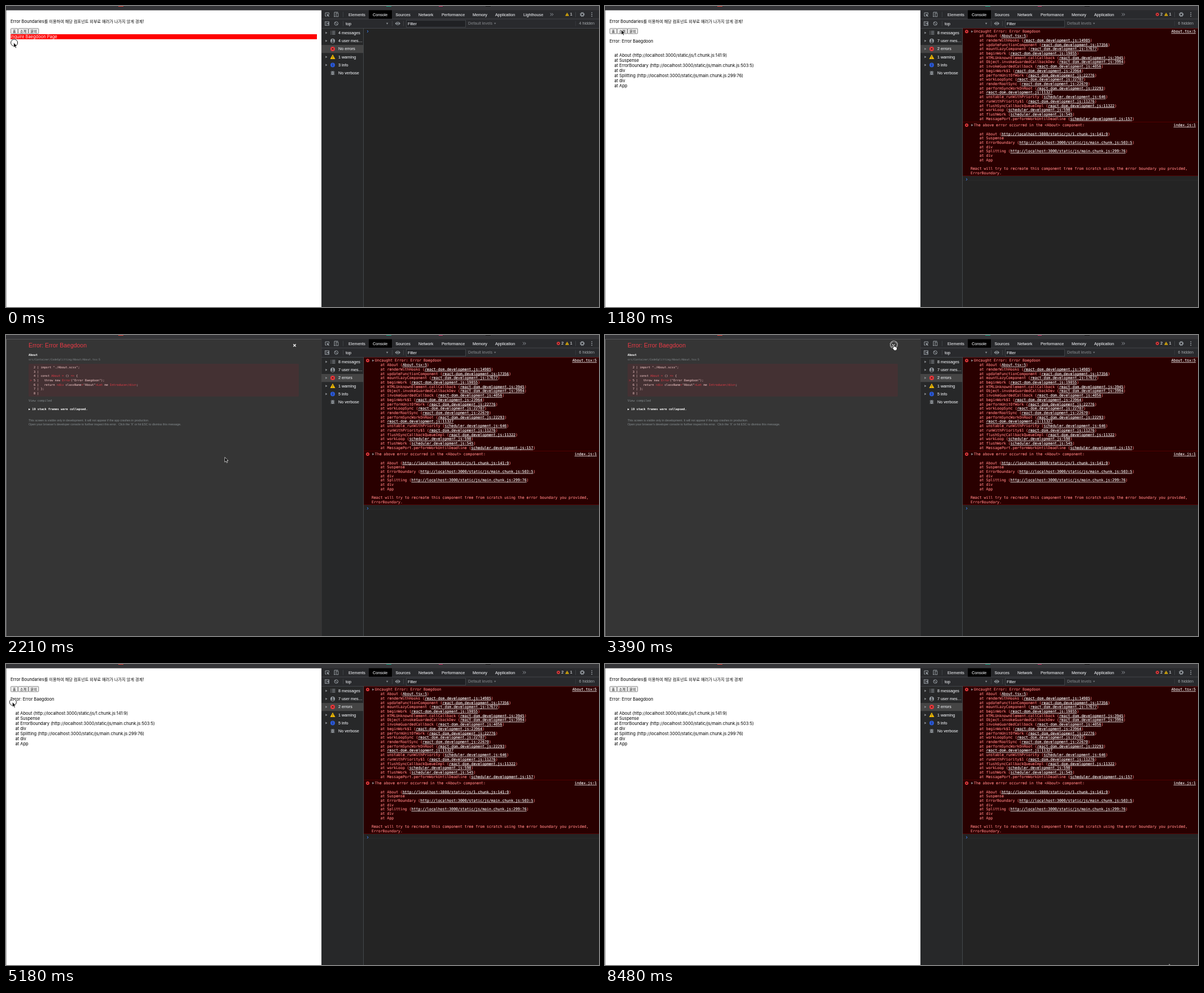
Recreate the animation shown at these times as an HTML page. Size 1051 by 533 pixels, loop 8.6 s.

```html
<!DOCTYPE html>
<html lang="ko">
<head>
<meta charset="utf-8">
<title>Error boundary demo</title>
<style>
html, body { margin: 0; width: 100%; height: 100%; overflow: hidden; background: #fff; }
svg { display: block; }
text { white-space: pre; }
.page { font: 7.5px Inter, "Noto Sans CJK KR", sans-serif; fill: #000; }
.ko { font-family: Inter, "Noto Sans CJK KR", "Noto Sans CJK", sans-serif; font-size: 7.18px; }
.btn { font: 6px "Noto Sans CJK KR", "Noto Sans CJK", sans-serif; text-anchor: middle; }
.ui { font: 7.2px "Liberation Sans", Arial, sans-serif; fill: #e8eaed; stroke: #e8eaed; stroke-width: .1; }
.dim { fill: #85888c; stroke: none; }
.soft { fill: #a4a8ac; stroke: none; }
.log { font: 6.52px "DejaVu Sans Mono", monospace; fill: #ff8080; stroke: #ff8080; stroke-width: .1; }
.log tspan { fill: #fff; stroke: #fff; text-decoration: underline; text-decoration-thickness: .6px; }
.end { text-anchor: end; }
.code { font: 5.22px "DejaVu Sans Mono", monospace; fill: #fccfcf; }
.code tspan { fill: #e83b46; }
.mono { font: 5.27px "DejaVu Sans Mono", monospace; fill: #fff; }
.bold { font-weight: bold; }
.path { font-size: 4.7px; }
.title { font: 10.47px "Liberation Sans", Arial, sans-serif; fill: #e83b46; }
.foot { font: 5.26px "Liberation Sans", Arial, sans-serif; }
.grey { fill: #878e91; }
.line { fill: none; stroke: #9aa0a6; }
</style>
</head>
<body>
<svg id="stage" width="1051" height="533" viewBox="0 0 1051 533"></svg>
<script>
const LOOP = 8600, STEP = 147.6;
const NAME = 'Baegdoon';

// [..] in a string becomes a highlighted span
const text = (x, y, s, cls) => `<text x="${x}" y="${y}" class="${cls}">` +
  s.replace(/</g, '&lt;').replace(/\[(.*?)\]/g, '<tspan>$1</tspan>') + '</text>';
const rect = (x, y, w, h, fill, more = '') =>
  `<rect x="${x}" y="${y}" width="${w}" height="${h}" fill="${fill}" ${more}/>`;
const path = (d, more = 'class="line"') => `<path d="${d}" ${more}/>`;
const dot = (x, y, r, fill) => `<circle cx="${x}" cy="${y}" r="${r}" fill="${fill}"/>`;
const group = (id, s) => `<g id="${id}">${s}</g>`;
const fill = c => `fill="${c}"`;

const badge = (x, y, r) => dot(x, y, r, '#e8393c') +
  path(`M${x - r * .4} ${y - r * .4}l${r * .8} ${r * .8}m0 ${-r * .8}l${-r * .8} ${r * .8}`,
    'stroke="#2b1010" stroke-width=".9"');
const warn = (x, y, r) => path(`M${x} ${y - r}l${r} ${r * 1.85}h${-2 * r}z`, fill('#f5bd00')) +
  rect(x - .4, y - r * .35, .8, r * .6, '#333') + rect(x - .4, y + r * .4, .8, .8, '#333');
const arrow = (x, y) => path(`M${x} ${y - 2}l3.2 2l-3.2 2z`, fill('#8f9296'));
const down = (x, y) => path(`M${x} ${y - 1.3}h3.6l-1.8 3z`, fill('#8f9296'));
const prompt = y => path(`M640 ${y - 2}l2 2l-2 2`, 'fill="none" stroke="#367cf1" stroke-width="1"');

// ---- web page ----
const STACK = [
  'About (http://localhost:3000/static/js/1.chunk.js:141:9)', 'Suspense',
  'ErrorBoundary (http://localhost:3000/static/js/main.chunk.js:503:5)', 'div',
  'Splitting (http://localhost:3000/static/js/main.chunk.js:299:76)', 'div', 'App'
];
const ROW = 8.93;
const sheet = color => rect(.5, 7.4, 558.5, 525.6, color);

function button(x, w, label) {
  return rect(x, 39.8, w, 9.2, '#efefef', 'stroke="#6b6b6b" stroke-width=".8" rx=".8"') +
    text(x + w / 2, 46.6, label, 'btn');
}

const page = sheet('#fff') +
  '<text x="8" y="29.7" class="page">Error Boundaries<tspan class="ko">를 이용하여 해당 컴포넌트 외부로 에러가 나가지 않게 경계!</tspan></text>' +
  button(8.6, 12.4, '홈') + button(21.6, 17.8, '소개') + button(40, 17.8, '문의') +
  group('inquire', rect(8, 50, 543, 8.8, '#f00') +
    `<text x="8" y="57" class="page" style="fill:#fff">Inquire ${NAME} Page</text>`) +
  group('failed', text(8, 64.8, `Error: Error ${NAME}`, 'page') + group('marks', '') +
    group('trace', STACK.map((s, i) => text(8, 90.3 + i * ROW, '    at ' + s, 'page')).join('')));

// ---- error overlay ----
const CODE = ['  2 | import "./About.scss";', '  3 |', '  4 | const [About =] () [=>] {',
  `[>] 5 |   throw new [Error]("Error ${NAME}");`,
  '  6 |   return [<div] className[=]"About"[>Let] me [Introduce</div>];', '  7 | };', '  8 |'];

const overlay = group('overlay', sheet('#353535') +
  text(40, 22, `Error: Error ${NAME}`, 'title') +
  path('M509.3 16.2l4.4 4.4m0-4.4l-4.4 4.4', 'stroke="#fff" stroke-width="1.3"') +
  text(40, 37.3, 'About', 'mono bold') +
  text(40, 44.5, 'src/Container/CodeSplitting/About/About.tsx:5', 'mono path grey') +
  rect(40, 51, 479, 58, '#443133', 'rx="1.5"') +
  CODE.map((s, i) => text(42.6, 58.8 + i * 7.7, s, 'code')).join('') +
  text(40, 117.7, 'View compiled', 'mono grey') +
  text(40, 133, '▶ 19 stack frames were collapsed.', 'mono bold') +
  text(40, 152.8, 'This screen is visible only in development. It will not appear if the app crashes in production.', 'foot grey') +
  text(40, 160.3, "Open your browser's developer console to further inspect this error.  Click the 'X' or hit ESC to dismiss this message.", 'foot grey'));

// ---- developer tools ----
const TABS = [['Elements', 607], ['Console', 650], ['Sources', 690.5], ['Network', 731],
  ['Performance', 772], ['Memory', 827], ['Application', 867]];
const sideY = i => 47.4 + i * 14.25;
const bug = (x, y) => `<ellipse cx="${x}" cy="${y + .3}" rx="2.1" ry="3" fill="#9aa0a6"/>` +
  path(`M${x - 3.6} ${y - 2}h7.2m-7.2 2.3h7.2m-7.2 2.3h7.2M${x - 1.6} ${y - 4}l1 1.4m2.2-1.4l-1 1.4`,
    'stroke="#9aa0a6" stroke-width=".8"') +
  path(`M${x - 1} ${y - .6}h2m-2 1.8h2`, 'stroke="#333" stroke-width=".7"');
const gear = (x, y) => `<circle cx="${x}" cy="${y}" r="3.4" fill="none" stroke="#9aa0a6" stroke-width="1.6" stroke-dasharray="1.5 1.17"/>` +
  `<circle cx="${x}" cy="${y}" r="2.4" class="line" stroke-width="1.3"/>`;

const sideIcons =
  path(`M578 ${sideY(0) - 2.5}h5.5m-5.5 2.5h5.5m-5.5 2.5h5.5M575.4 ${sideY(0) - 2.5}h1.3m-1.3 2.5h1.3m-1.3 2.5h1.3`) +
  dot(579, sideY(1), 4, '#9aa0a6') + dot(579, sideY(1) - 1.3, 1.3, '#292a2d') +
  path(`M576.4 ${sideY(1) + 2.1}q2.6-2.6 5.2 0q-2.6 2.4-5.2 0z`, fill('#292a2d')) +
  badge(579, sideY(2), 4) + warn(579, sideY(3), 4.5) +
  dot(579, sideY(4), 4, '#2a59d8') + rect(578.5, sideY(4) - .7, 1, 2.8, '#16224a') + rect(578.5, sideY(4) - 2.4, 1, 1, '#16224a') +
  bug(579, sideY(5));

const side = labels => labels.map((s, i) => text(589, sideY(i) + 2.5, s, 'ui')).join('');

const tools = rect(559, 7, 492, 526, '#242424') + rect(559, 7, 492, 32.5, '#292a2d') +
  rect(559, 39, 74.5, 494, '#272829') + rect(559, 7, .6, 526, '#3a3b3e') +
  rect(559, 22.6, 492, .8, '#494c50') + rect(559, 39, 492, .8, '#494c50') +
  rect(633, 39, .9, 494, '#494c50') + rect(643, 7, 41, 15.6, '#000') +
  TABS.map(([s, x]) => text(x, 17.5, s, 'ui')).join('') +
  path('M566 18v-6h6.5v2.5M566 18h2') + path('M568.5 14l4.7 1.8l-1.9.9l1.7 1.8l-.8.7l-1.7-1.8l-.8 1.5z', fill('#9aa0a6')) +
  path('M582 18.5v-7.5h6.5M581 18.7h3') + rect(585.2, 12.8, 3.6, 6, 'none', 'stroke="#9aa0a6" stroke-width=".9"') +
  rect(597, 10.5, .7, 9, '#494c50') +
  rect(565.5, 27.8, 7, 6.6, 'none', 'stroke="#9aa0a6" stroke-width=".9"') + path('M567.6 28v6.4M571.4 29.3l-2 1.8l2 1.8z', 'fill="#9aa0a6" stroke="#9aa0a6" stroke-width=".7"') +
  '<circle cx="585.3" cy="31" r="3.2" class="line" stroke-width="1"/>' + path('M583 28.8l4.6 4.6') +
  [597, 684, 704].map(x => rect(x, 26.5, .7, 9, '#494c50')).join('') +
  text(602, 33.5, 'top', 'ui') + down(673.8, 31) +
  path('M689.6 31q4.7-6 9.4 0q-4.7 6-9.4 0z', fill('#9aa0a6')) + dot(694.3, 31, 2.2, '#292a2d') + dot(694.3, 31, 1.2, '#9aa0a6') +
  rect(709.5, 25.2, 105, 12.4, '#202124', 'stroke="#494c50" stroke-width=".8"') +
  text(712, 33.8, 'Filter', 'ui') + text(819, 33.4, 'Default levels', 'ui dim') +
  path('M865 29.8h3.4l-1.7 2.8z', fill('#75787c')) +
  rect(1009, 26.5, .7, 9, '#3c3e42') + gear(1021.3, 15) +
  [11.8, 15, 18.2].map(y => dot(1038.3, y, .9, '#9aa0a6')).join('') +
  rect(1009, 10.5, .7, 9, '#494c50') +
  warn(994.5, 14.9, 3.2) + text(999.7, 17.3, '1', 'ui') +
  rect(559, 69, 74, 14.2, '#454545') + sideIcons +
  [0, 1, 3, 4].map(i => arrow(566.3, sideY(i))).join('');

const more = x => path(`M${x} 12.6l2.3 2.4l-2.3 2.4m2.9-4.8l2.3 2.4l-2.3 2.4`, 'class="line" stroke-width=".9"');

const quiet = group('quiet', text(917, 17.5, 'Lighthouse', 'ui') + more(964.6) +
  text(1043, 33.4, '4 hidden', 'ui soft end') +
  side(['4 messages', '4 user mes…', 'No errors', '1 warning', '3 info', 'No verbose']) + prompt(45));

const CALLS = `About ([About.tsx:5])
renderWithHooks ([R14985])
updateFunctionComponent ([R17356])
mountLazyComponent ([R17677])
beginWork ([R19055])
HTMLUnknownElement.callCallback ([R3945])
Object.invokeGuardedCallbackDev ([R3994])
invokeGuardedCallback ([R4056])
beginWork$1 ([R23964])
performUnitOfWork ([R22776])
workLoopSync ([R22707])
renderRootSync ([R22670])
performSyncWorkOnRoot ([R22293])
[R11327]
unstable_runWithPriority ([S646])
runWithPriority$1 ([R11276])
flushSyncCallbackQueueImpl ([R11322])
workLoop ([S590])
flushWork ([S545])
MessagePort.performWorkUntilDeadline ([S157])`
  .replace(/\[R/g, '[react-dom.development.js:').replace(/\[S/g, '[scheduler.development.js:').split('\n');

const LINE = 7.72;
const entry = (y, head, link) => badge(641, y, 3) + arrow(649.2, y) +
  text(653.8, y + 2.2, head, 'log') + text(1047, y + 2.2, `[${link}]`, 'log end');
const calls = (y, list) => list.map((s, i) => text(663.7, y + i * LINE, 'at ' + s, 'log')).join('');

const noisy = group('noisy', more(916) + badge(979, 14.8, 2.9) + text(984.2, 17.3, '2', 'ui') +
  text(1043, 33.4, '6 hidden', 'ui soft end') + arrow(566.3, sideY(2)) +
  side(['8 messages', '7 user mes…', '2 errors', '1 warning', '5 info', 'No verbose']) +
  rect(634, 39.8, 417, 260.6, '#290000') +
  [39.6, 205.2, 300].map(y => rect(634, y, 417, .8, '#5c0000')).join('') +
  entry(45.2, `Uncaught Error: Error ${NAME}`, 'About.tsx:5') + calls(55.1, CALLS) +
  entry(211, 'The above error occurred in the <About> component:', 'index.js:1') +
  calls(228.5, STACK.map(s => s.replace(/\((.*)\)/, '([$1])'))) +
  text(648, 290.3, 'React will try to recreate this component tree from scratch using the error boundary you provided,', 'log') +
  text(648, 298, 'ErrorBoundary.', 'log') + rect(634, 308.6, 417, .6, '#2d2d2f') + prompt(307));

const frame = rect(0, 0, 1051, 7.4, '#353538') + rect(199, 0, 9, 1, '#e8453c') +
  rect(674, 0, 9, 1, '#12a683') + rect(767, 0, 7, 1, '#d6336c') + rect(850, 0, 9, 1, '#111');

// ---- pointer ----
const ringShape = (c, w) => `<circle cx="1" cy="0" r="6" fill="none" stroke="${c}" stroke-width="${w}"/>`;
const pointer = group('pointer',
  group('ring', ringShape('#fff', 2) + ringShape('#000', .9)) +
  group('arrow', path('M0 0v8.6l2-1.9l1.4 3.1l1.5-.7l-1.4-3h2.7z', 'fill="#000" stroke="#fff" stroke-width=".7"')) +
  group('hand', path('M0 1.2q0-1.2 1-1.2q.9 0 .9 1.2v2.4q.3-.7 1-.5q.6.1.7.6q1.4-.5 1.6.6q1.4-.3 1.4.9v2q0 2.9-2.8 2.9h-1.3q-1.4 0-2.2-1.4l-2-3q-.5-1 .3-1.3q.6-.1 1.4.9z',
    'fill="#fff" stroke="#000" stroke-width=".8"')));

const stage = document.getElementById('stage');
stage.innerHTML = rect(0, 0, 1051, 533, '#4a4a4c') + page + overlay + tools + quiet + noisy + frame + pointer;

const part = {};
stage.querySelectorAll('g[id]').forEach(g => part[g.id] = g);
const show = (id, on) => part[id].setAttribute('visibility', on ? 'inherit' : 'hidden');

// selection strips behind the trace, the first one for its blank line
const lengths = [0, ...[...part.trace.children].map(el => el.getComputedTextLength())];
part.marks.innerHTML = lengths.map((w, i) => rect(8, 74.3 + i * ROW, w + 2.2, ROW + .05, '#b3d7ff')).join('');
const strips = [...part.marks.children];

// ---- time ----
const MOVES = [
  [0, 13.6, 65], [590, 29, 42.3], [1320, 29, 42.3], [2060, 380, 229], [3100, 511, 17.3],
  [3540, 511, 17.3], [4430, 281, 108], [4900, 60, 78], [5180, 11, 67.5], [5330, 24, 86],
  [5480, 62, 108], [5930, 197, 154], [6230, 197, 154], [7260, 998.5, 527], [7560, 1000, 531.6], [LOOP, 1000, 531.6]
];
const PRESSES = [[0, 150], [1030, 1180], [3390, 3540], [5180, 5930], [6230, 6380]];
const within = (t, a, b) => t >= a && t < b;

function place(t) {
  const i = Math.max(1, MOVES.findIndex(m => m[0] > t));
  const [t0, x0, y0] = MOVES[i - 1], [t1, x1, y1] = MOVES[i];
  const u = (t - t0) / (t1 - t0), e = u * u * (3 - 2 * u);
  return [x0 + (x1 - x0) * e, y0 + (y1 - y0) * e];
}

function draw(t) {
  const crashed = t >= 1180;
  const [x, y] = place(Math.floor(t / STEP + .04) * STEP);
  show('inquire', !crashed);
  show('failed', crashed);
  show('quiet', !crashed);
  show('noisy', crashed);
  show('overlay', within(t, 1320, 3540));
  const hand = within(t, 3100, 3690);
  show('arrow', !hand);
  show('hand', hand);
  show('ring', PRESSES.some(p => within(t, ...p)));
  show('pointer', !within(t, 1320, 1470));
  part.pointer.setAttribute('transform', `translate(${x.toFixed(2)} ${y.toFixed(2)})`);
  strips.forEach((s, i) => s.setAttribute('visibility',
    within(t, 5330, 6230) && y > 74.3 + i * ROW ? 'inherit' : 'hidden'));
}

const start = performance.now();
function tick() {
  draw((performance.now() - start) % LOOP);
  requestAnimationFrame(tick);
}
tick();
</script>
</body>
</html>
```
